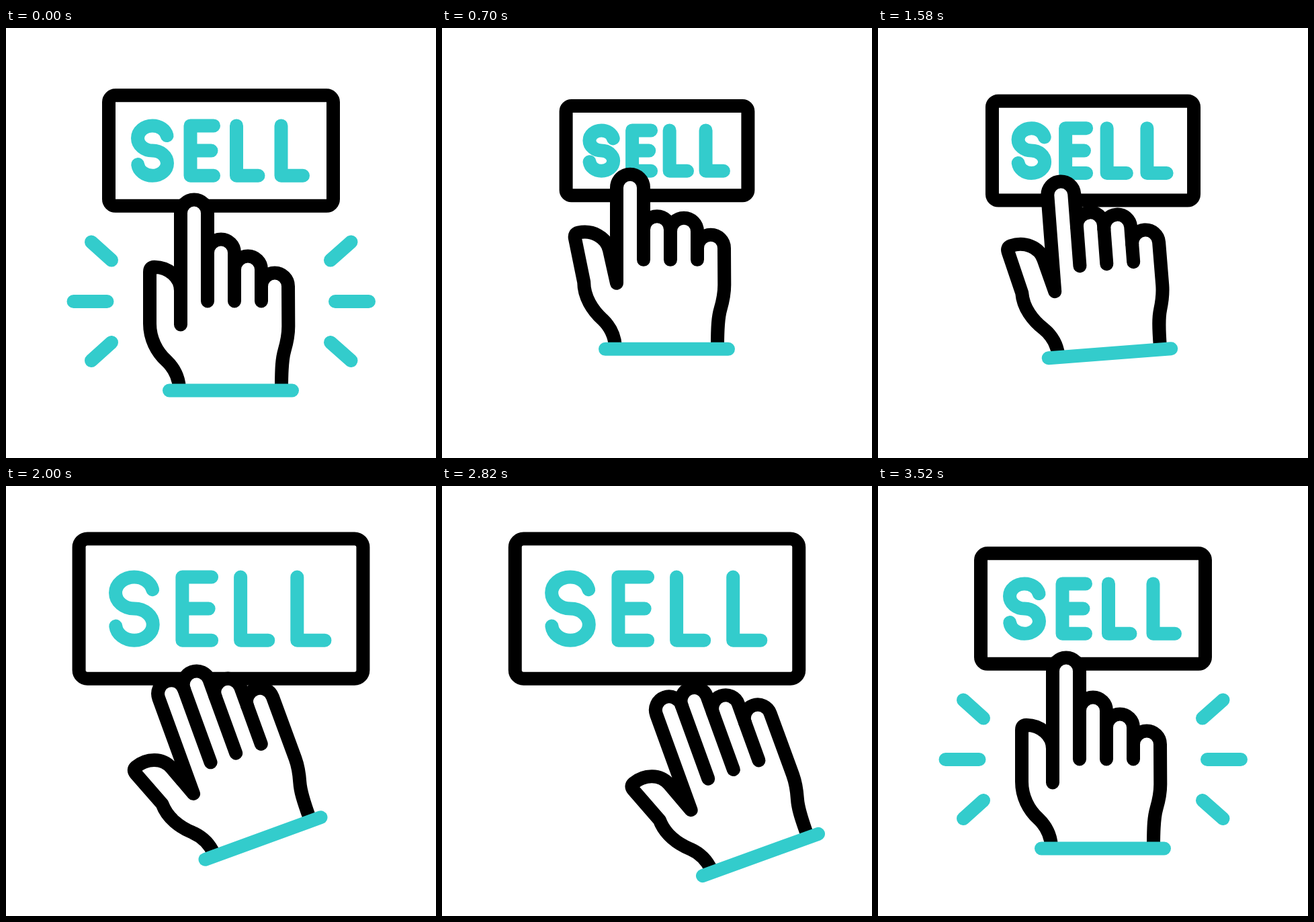
Write an HTML page that moves like this. It is 640 by 640 pixels and loops after 3.6 s.

```html
<!DOCTYPE html>
<html lang="en">
<head>
<meta charset="utf-8">
<title>Sell button</title>
<style>
  html, body { margin: 0; width: 100%; height: 100%; overflow: hidden; background: #fff; }
  svg { display: block; width: 100%; height: 100%; }
  .line { fill: none; stroke-width: 20; stroke-linecap: round; stroke-linejoin: round; }
  .black { stroke: #000; }
  .teal { stroke: #3cc; }
  .white { fill: #fff; }
</style>
</head>
<body>
<svg viewBox="0 0 640 640">
  <g id="rays" class="line teal">
    <path d="M100.5 407H150.5M127 318.5L157 345.5M127 495L157 468"/>
    <path d="M540 407H490M513.5 318.5L483 345.5M513.5 495L483 468"/>
  </g>
  <g id="board" class="line">
    <rect class="black white" x="-167" y="-82.25" width="334" height="164.5" rx="10"/>
    <g class="teal">
      <path d="M-80.5 -22.5A22 18.6 0 0 0 -102 -37.2A22 18.6 0 0 0 -102 0A22 18.6 0 0 1 -102 37.2A22 18.6 0 0 1 -123.8 20.5"/>
      <path d="M-11 -37.2H-45.5V37.2H-11M-45.5 0H-14.5"/>
      <path d="M23 -37.2V37.2H55.5"/>
      <path d="M89.5 -37.2V37.2H122"/>
    </g>
  </g>
  <g id="hand" class="line">
    <path id="skin" class="black white"/>
    <path id="folds" class="black"/>
    <path class="teal" d="M243 539.5H426"/>
  </g>
</svg>
<script>
const LOOP = 3600;
const el = id => document.getElementById(id);
const rays = el('rays'), board = el('board'), hand = el('hand');
const skin = el('skin'), folds = el('folds');

const rest    = { size: 1, index: 275.5, middle: 334.5, ring: 359.5, little: 384.5, thumb: 0, wrist: 214, x: 0, y: 0, turn: 0 };
const press   = { size: 0.796, index: 301.3, middle: 364, ring: 364.7, little: 389.7, thumb: 13.6, wrist: 211, x: 0, y: -66.5, turn: 0 };
const release = { ...press, size: 0.891, index: 315.2 };
const open    = { size: 1.266, index: 290.5, middle: 290.5, ring: 317, little: 346.6, thumb: 20.5, wrist: 211, x: 48, y: -15, turn: -20 };
const away    = { ...open, x: 140, y: 9.5 };

const keys = [
  [0, rest], [200, rest], [800, press], [1100, release], [1400, press],
  [2000, open], [2800, away], [3400, rest], [LOOP, rest]
];

const clamp = v => Math.min(1, Math.max(0, v));
const ease = u => u * u * (3 - 2 * u);

function poseAt(t) {
  let i = 0;
  while (i < keys.length - 2 && t >= keys[i + 1][0]) i++;
  const [t0, a] = keys[i], [t1, b] = keys[i + 1];
  const k = ease(clamp((t - t0) / (t1 - t0)));
  const pose = {};
  for (const name in a) pose[name] = a[name] + (b[name] - a[name]) * k;
  return pose;
}

// Thumb points swing around the base of the thumb
function swing(deg) {
  const r = deg * Math.PI / 180, c = Math.cos(r), s = Math.sin(r);
  return (x, y) => {
    const dx = x - 260, dy = y - 441.5;
    return `${(260 + dx * c + dy * s).toFixed(2)} ${(441.5 - dx * s + dy * c).toFixed(2)} `;
  };
}

function drawHand(p) {
  const th = swing(p.thumb), w = p.wrist;
  const tips = [p.index, p.middle, p.ring, p.little];
  let d = `M258 536C257 520 250 506 239 495.5C224 482 ${w} 462 ${w} 440`;
  d += 'L' + th(214, 363) + 'Q' + th(214, 355.7) + th(221, 355.7);
  d += 'C' + th(242, 356) + th(260, 371) + th(260, 391) + 'L260 441.5';
  tips.forEach((y, i) => {
    const x = 260 + 40 * i;
    d += `L${x} ${y}A20 20 0 0 1 ${x + 40} ${y}`;
  });
  d += 'L420.3 444C420.3 458 418 468 414.5 480C411 492 410 505 410 536';
  skin.setAttribute('d', d);

  folds.setAttribute('d', [0, 1, 2]
    .map(i => `M${300 + 40 * i} ${Math.max(tips[i], tips[i + 1])}V406.5`).join(''));

  hand.setAttribute('transform',
    `translate(${p.x} ${p.y}) rotate(${p.turn} 334.5 539.5)`);
}

function draw(t) {
  const p = poseAt(t);
  board.setAttribute('transform', `translate(320 182.6) scale(${p.size})`);
  board.style.strokeWidth = 20 / p.size;
  drawHand(p);
  rays.setAttribute('opacity',
    t < 1800 ? 1 - clamp((t - 200) / 80) : clamp((t - 3440) / 80));
}

function tick(now) {
  draw(now % LOOP);
  requestAnimationFrame(tick);
}
draw(0);
requestAnimationFrame(tick);
</script>
</body>
</html>
```
